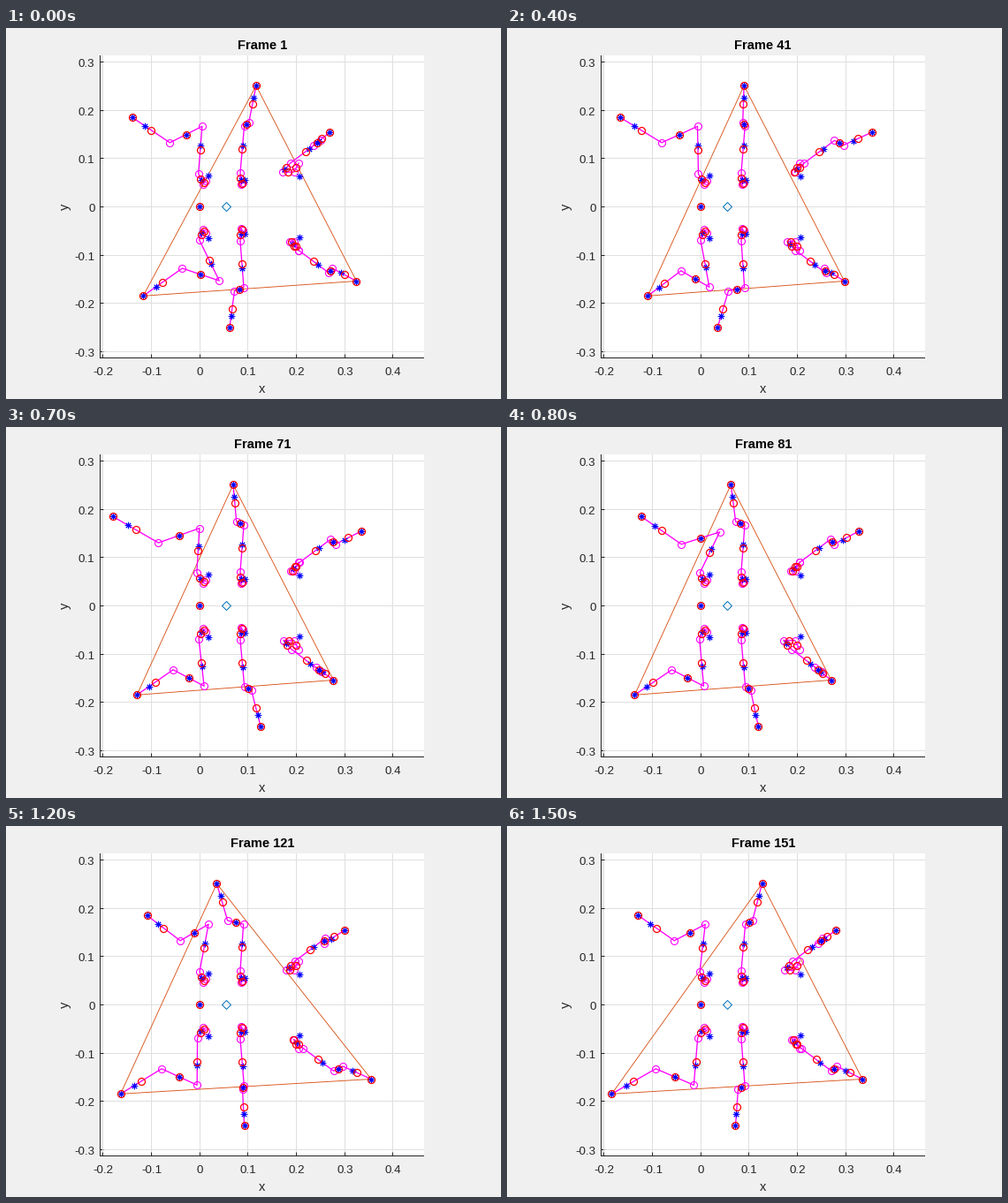
Recreate the animation shown at these times as a matplotlib script. Size 560 by 420 pixels, loop 1.6 s.

```python
import math

import numpy as np
import matplotlib.pyplot as plt
from matplotlib.animation import FuncAnimation
from matplotlib.patches import Rectangle

W, H, DPI = 560, 420, 100
PX = 72 / DPI  # points per pixel
FRAMES, INTERVAL = 16, 100
BODY = np.array([218.6, 202.3])
STEP = 54.66  # pixels between grid lines
LEFT, RIGHT, TOP, BOTTOM = 106.5, 473, 31, 373.5
INK, GRID = "#262626", "#dfdfdf"

# Wave gait: the legs swing one after the other, in frames and pixels.
PERIOD, SWING, STRIDE = 16.5, 2.2, 53
FIRST_SWING, SWING_GAP = -0.3, 2.7

# Joints from foot to hip: forward, sideways, share of the foot's travel.
REAR = [(-74, 101, 1), (-32, 72.5, 0.7), (4, 91, 0.43), (-0.8, 37.5, 0.08),
        (4, 25.5, 0), (7, 29.5, 0)]
MIDDLE = [(46, 137, 1), (46.2, 95.2, 0.54), (50.6, 91.2, 0.02),
          (46.4, 38.8, 0), (47.3, 25, 0), (49, 27, 0)]
FRONT = [(169.5, 84.2, 1), (144.6, 69.7, 0.71), (144, 75, 0.32),
         (109.7, 49.2, 0.31), (100, 39.2, 0.27), (107, 39.2, 0),
         (112.5, 49.3, 0)]
HIPS = [(10.5, 35.8), (51, 30.5), (113, 34.5)]
KINDS = [REAR, MIDDLE, FRONT]
UP, DOWN = -1, 1
# (kind, side) in the order in which the legs swing
LEGS = [(0, DOWN), (2, UP), (1, DOWN), (0, UP), (2, DOWN), (1, UP)]
SUPPORT = (5, 0, 4)

plt.rcParams["font.family"] = "Liberation Sans"


def gait(t, order):
    """Foot travel from its middle position, and how far it is raised."""
    start = FIRST_SWING + SWING_GAP * order - SWING / 2
    phase = (t - start) % PERIOD
    if phase < SWING:
        u = phase / SWING
        return STRIDE * (u * u * (3 - 2 * u) - 0.5), math.sin(math.pi * u)
    return STRIDE * (0.5 - (phase - SWING) / (PERIOD - SWING)), 0


def joints(t, order):
    kind, side = LEGS[order]
    rest = np.array(KINDS[kind])
    travel, raised = gait(t, order)
    p = rest[:, :2].copy()
    p[:, 0] += travel * rest[:, 2]
    # A raised leg folds its two knees towards the hip.
    inward = np.array(HIPS[kind]) - rest[0, :2]
    fold = inward / np.hypot(*inward) + (0.4, 0)
    p[1] += 5 * raised * fold
    p[2] += 13 * raised * fold
    return BODY + p * (1, side)


def masses(p, kind):
    """Points of mass along the outer four links."""
    shares = (0.65, 0.5, 0.37, 0.7) if kind == 2 else (0.33, 0.5, 0.41, 0.62)
    return [a + f * (b - a) for a, b, f in zip(p, p[1:], shares)]


fig = plt.figure(figsize=(W / DPI, H / DPI), dpi=DPI, facecolor="#f0f0f0")
ax = fig.add_axes([0, 0, 1, 1])
ax.set_xlim(0, W)
ax.set_ylim(H, 0)
ax.axis("off")


def line(color, width, **kw):
    return ax.plot([], [], color=color, lw=width * PX, **kw)[0]


def dots(marker, color, size, width, **kw):
    return ax.plot([], [], ls="", marker=marker, ms=size * PX, mec=color,
                   mfc="none", mew=width * PX, **kw)[0]


def label(x, y, s, size, ha="center", va="baseline", color=INK, **kw):
    return ax.text(x, y, s, fontsize=size * PX, ha=ha, va=va, color=color, **kw)


def rule(xs, ys, color):
    ax.plot(xs, ys, color=color, lw=PX, solid_capstyle="butt", snap=False,
            zorder=1)


def draw_axes():
    ax.add_patch(Rectangle((LEFT, TOP), RIGHT - LEFT, BOTTOM - TOP,
                           fc="white", ec="none", snap=False, zorder=0))
    for i in range(-3, 5):
        value = f"{i / 10:g}"
        x = math.floor(BODY[0] + 0.5 + i * STEP) + 0.5
        y = math.floor(BODY[1] + 0.2 - i * STEP) + 0.5
        if i > -3:
            rule([x, x], [TOP, BOTTOM], GRID)
            rule([x, x], [BOTTOM, BOTTOM - 4], INK)
            label(x, 393, value, 13.33)
        if i < 4:
            rule([LEFT, RIGHT], [y, y], GRID)
            rule([LEFT, LEFT + 4], [y, y], INK)
            label(100.5, y + 5.5, value, 13.33, ha="right")
    rule([LEFT, LEFT], [TOP, BOTTOM + 0.5], INK)
    rule([LEFT, RIGHT], [BOTTOM, BOTTOM], INK)
    label(289.5, 413, "x", 14.67)
    label(67, 202, "y", 14.67, va="center", rotation=90)


draw_axes()
title = label(289.7, 24, "", 14.67, weight="bold", color="black")
centre = dots("D", "#0072bd", 6.4, 1, zorder=2)
centre.set_data([248.5], [202.3])
triangle = line("#d95319", 0.9, zorder=2)
limbs = [line("#ff00ff", 1.33, zorder=3) for _ in LEGS]
knots = dots("o", "#ff00ff", 8, 1.1, zorder=4)
stars = dots((8, 2, 0), "#0000ff", 7.4, 1, zorder=5)
rings = dots("o", "#ff0000", 8, 1.25, zorder=6)


def update(t):
    title.set_text(f"Frame {10 * t + 1}")
    feet, knot_pts, ring_pts, star_pts = [], [], [BODY], [BODY]
    for order, (kind, side) in enumerate(LEGS):
        p = joints(t, order)
        limbs[order].set_data(*p.T)
        feet.append(p[0])
        knot_pts.extend(p[1:])
        ring_pts.extend([p[0], *(p[:-1] + p[1:]) / 2])
        hip = BODY + np.array(HIPS[kind]) * (1, side)
        star_pts.extend([p[0], hip, *masses(p, kind)])
    for artist, pts in ((knots, knot_pts), (rings, ring_pts), (stars, star_pts)):
        artist.set_data(*np.array(pts).T)
    corners = [feet[i] for i in SUPPORT]
    triangle.set_data(*np.array(corners + corners[:1]).T)
    return [title, triangle, *limbs, knots, stars, rings]


anim = FuncAnimation(fig, update, frames=FRAMES, interval=INTERVAL,
                     repeat=True, repeat_delay=0, blit=False)
plt.show()
```
